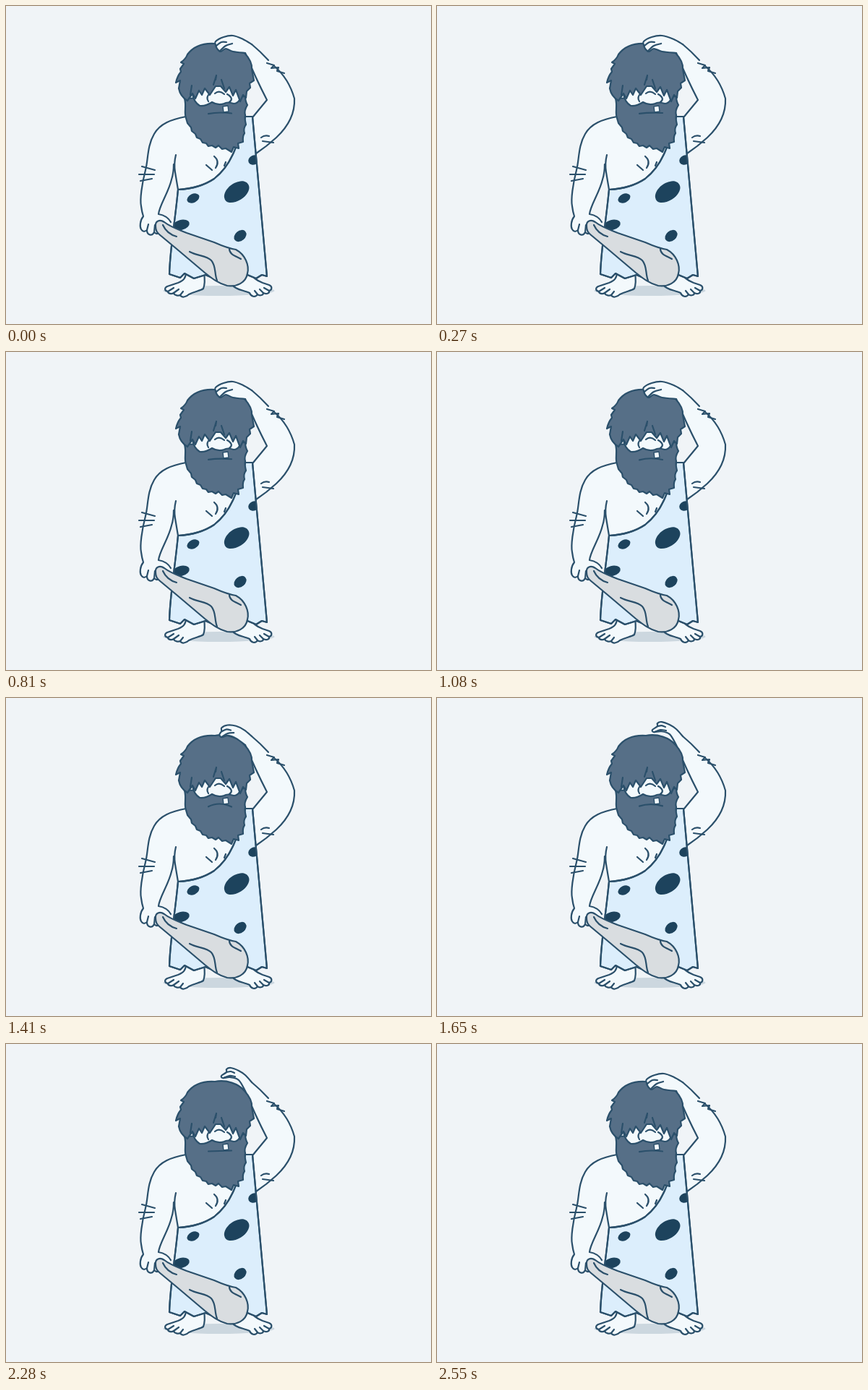
These frames come from a looping animation (588 by 440 pixels, 2580 ms). An HTML page with a canvas:

```html
<!DOCTYPE html>
<html lang="en">
<head>
<meta charset="utf-8">
<title>Puzzled caveman</title>
<style>
html, body { margin: 0; width: 100%; height: 100%; overflow: hidden; background: #f0f4f7; }
canvas { display: block; }
</style>
</head>
<body>
<canvas id="stage" width="588" height="440"></canvas>
<script>
const ctx = document.getElementById('stage').getContext('2d');
const LOOP = 2580, STEP = 30;
const INK = '#2b506b', SKIN = '#f3f9fc', HAIR = '#566f87', CLOTH = '#dceefc',
      SPOT = '#1d435d', WOOD = '#d9dde0', SHADE = '#ccd7df', BACK = '#f0f4f7';

function shape(d, fill, stroke = INK, width = 2.2) {
  const path = new Path2D(d);
  if (fill) { ctx.fillStyle = fill; ctx.fill(path); }
  if (stroke) { ctx.strokeStyle = stroke; ctx.lineWidth = width; ctx.stroke(path); }
}
const line = d => shape(d);

function oval(x, y, rx, ry, angle, color) {
  ctx.fillStyle = color;
  ctx.beginPath();
  ctx.ellipse(x, y, rx, ry, angle, 0, Math.PI * 2);
  ctx.fill();
}

// Smooth open curve through a few points
function curve(points) {
  const at = i => points[Math.max(0, Math.min(points.length - 1, i))];
  let d = `M${points[0]}`;
  for (let i = 0; i < points.length - 1; i++) {
    const [p, a, b, n] = [at(i - 1), at(i), at(i + 1), at(i + 2)];
    const c1 = a.map((v, k) => v + (b[k] - p[k]) / 6);
    const c2 = b.map((v, k) => v - (n[k] - a[k]) / 6);
    d += `C${c1} ${c2} ${b}`;
  }
  return d;
}

const mix = (a, b, p) => a.map((pt, i) => pt.map((v, k) => v + (b[i][k] - v) * p));

function keyed(keys, t) {
  const i = Math.max(1, keys.findIndex(k => k[0] >= t));
  const [t0, a] = keys[i - 1], [t1, b] = keys[i];
  const u = (t - t0) / (t1 - t0);
  return a + (b - a) * u * u * (3 - 2 * u);
}

const liftKeys = [[0, 0], [1080, 0], [1410, .55], [1600, 1], [1920, .88], [2280, 1], [2550, 0], [LOOP, 0]];
const reachKeys = [[0, 0], [270, 4], [540, 0], [810, 0], [1080, 4], [1410, 0], [LOOP, 0]];
const frownKeys = [[0, 2], [540, 0], [1080, 3], [1410, 6], [1920, 1], [2280, 0], [2550, 2], [LOOP, 2]];

const handDown = {
  edge: [[340,53],[328,46],[314,41],[301,43],[290,49],[290,54],[292,59],[297,63],[304,59],[314,63],[331,65]],
  upper: [[291,55],[298,50],[305,50]],
  lower: [[296,62],[304,55],[313,52]]
};
const handUp = {
  edge: [[340,53],[331,43],[322,37],[311,33],[305,35],[305,39],[298,44],[300,47],[310,46],[322,50],[331,65]],
  upper: [[305,39],[311,38],[316,40]],
  lower: [[301,47],[309,44],[317,45]]
};

function feet() {
  oval(294.5, 394, 77, 7, 0, SHADE);
  shape(`M249 368C249 376 246 380 238 383L223 388C219 390 219 394 224 395
    C224 398 229 399 232 397C233 401 239 401 241 400C243 404 249 403 253 399
    C261 395 269 394 273 391Q276 383 274 370`, SKIN);
  line('M224 395L232 390M232 397L239 392M241 400L245 395');
  shape(`M338 368C341 376 347 380 355 383L364 386C369 388 368 393 364 394
    C365 398 360 399 356 397C356 401 350 401 348 399C345 404 339 402 337 397
    C329 393 318 393 313 386V370`, SKIN);
  line('M364 394L357 390M356 397L351 392M348 399L344 394');
}

function raisedArm() {
  shape(`M331 65L340 53Q354 64 371 83C386 96 394 110 399 128C400 148 390 167 374 182
    Q361 194 346 204L338 160L361 130Q345 99 331 65`, SKIN, null);
  line(`M331 65Q345 99 361 130L342 153M340 53Q352 63 363 75
    M371 83C386 96 394 110 399 128C400 148 390 167 374 182Q361 194 346 204`);
  line('M361 79L371 82L367 86L377 85L375 90L385 93M353 182Q358 178 364 180M355 187L370 189');
}

function torso() {
  shape(`M249 153L335 152L328 184C317 207 300 236 278 245Q258 253 238 254
    L233 219L235 206L220 190L222 161Z`, SKIN, null);
}

function tunic() {
  const d = `M238 254C259 253 276 247 288 239C311 221 320 195 331 153L341 153
    L361 374L354 372L346 377L334 372L322 377L304 373L290 378L276 372
    L260 377L247 370L241 376L226 371C227 335 234 297 238 254Z`;
  shape(d, CLOTH);
  ctx.save();
  ctx.clip(new Path2D(d));
  oval(343, 213, 8, 6.5, -.45, SPOT);
  shape(`M302 265C301 256 311 245 322 243C332 240 340 248 335 257
    C331 266 318 273 309 272Q303 271 302 265`, SPOT, null);
  oval(259, 266, 9, 6, -.45, SPOT);
  oval(242, 303, 12, 7, -.25, SPOT);
  oval(324, 318, 9.5, 7, -.7, SPOT);
  ctx.restore();
  shape(d, null);
}

function loweredArm() {
  const outer = `M249 153C228 157 213 163 205 177C195 194 197 212 193 227
    C188 246 185 268 187 277Q188 285 190 291C185 297 185 306 187 309Q190 314 195 310
    C195 317 202 319 205 313Q210 318 213 311`;
  shape(`${outer}L228 299Q223 290 211 288C212 276 225 258 229 240L232 219L235 206Z`, SKIN, null);
  line(`${outer}M195 310L197 302M205 313L206 303
    M228 299Q223 290 211 288C212 276 225 258 229 240Q232 231 232 219
    M235 206Q232 218 234 230L238 254`);
  line('M188 222L206 227M184 233L205 233M186 242L202 239');
  line('M288 208C294 213 294 218 290 224M277 220L285 227M304 216L302 221');
}

function club() {
  shape(`M207 305C206 297 213 295 219 299C228 306 238 309 250 314L288 327
    Q306 335 318 337C331 344 337 359 334 370C332 383 319 389 306 387
    C294 384 285 377 275 369L236 336L212 316Q207 312 207 305Z`, WOOD);
  line(`M217 303C221 312 229 317 236 319M254 340C265 346 277 345 284 352
    C291 360 288 370 292 380M309 336C309 344 318 346 325 350`);
}

function head(frown) {
  shape(`M247 128C250 139 246 147 249 155L251 162L256 168L257 173L262 177
    L264 182L269 184L272 189L277 190L280 194L285 193L290 196L294 193L299 198
    L304 197L312 202L315 195L322 197L321 190L328 188
    Q327 180 330 176Q328 169 332 164Q330 156 331 151Q329 145 334 137Q331 132 331 125Z`, HAIR);
  shape(`M257 112L325 112L323 130Q320 135 315 135Q306 132 302 135Q293 138 285 133
    Q276 139 268 138Q259 133 257 112Z`, SKIN, null);
  line(`M323 130Q320 135 315 135Q306 132 302 135Q293 138 285 133Q276 139 268 138Q260 133 258 122`);
  line(`M289 121Q295 116 302 122M282 121Q276 126 280 132
    M306 122Q316 128 309 133`);
  shape(`M251 131Q241 125 239 114L241 103L235 106Q237 97 242 91L241 87L246 80
    L242 78Q249 73 251 67C260 55 274 51 289 52C305 49 322 55 330 65
    Q341 77 340 87L343 103L337 107L338 113L333 118L332 127L328 123L324 132
    L321 124L318 116L314 124L309 112L304 119L297 111L290 111L282 123
    L275 114L271 123L267 117L262 128L258 121Z`, HAIR);
  line('M291 96L287 109M291 96L290 102M298 102L302 114M257 110L255 123');
  shape('M300 139L307 138L308 146L301 147Z', SKIN, INK, 1.4);
  line(`M280 ${148.5 + frown * .3}Q295 ${148 - frown * .9} 312 ${147.5 + frown * .5}`);
}

function scratchingHand(lift, reach) {
  // The fingers slide across the scalp while the wrist stays put
  const slide = ([x, y]) => [x - reach * Math.max(0, Math.min(1, (331 - x) / 25)), y];
  const part = name => curve(mix(handDown[name], handUp[name], lift).map(slide));
  shape(part('edge'), SKIN);
  line(part('upper'));
  line(part('lower'));
}

function draw(now) {
  const t = Math.floor(now % LOOP / STEP) * STEP;
  ctx.fillStyle = BACK;
  ctx.fillRect(0, 0, 588, 440);
  ctx.lineCap = ctx.lineJoin = 'round';
  feet();
  raisedArm();
  torso();
  tunic();
  loweredArm();
  club();
  head(keyed(frownKeys, t));
  scratchingHand(keyed(liftKeys, t), keyed(reachKeys, t));
  requestAnimationFrame(draw);
}
draw(0);
</script>
</body>
</html>
```
